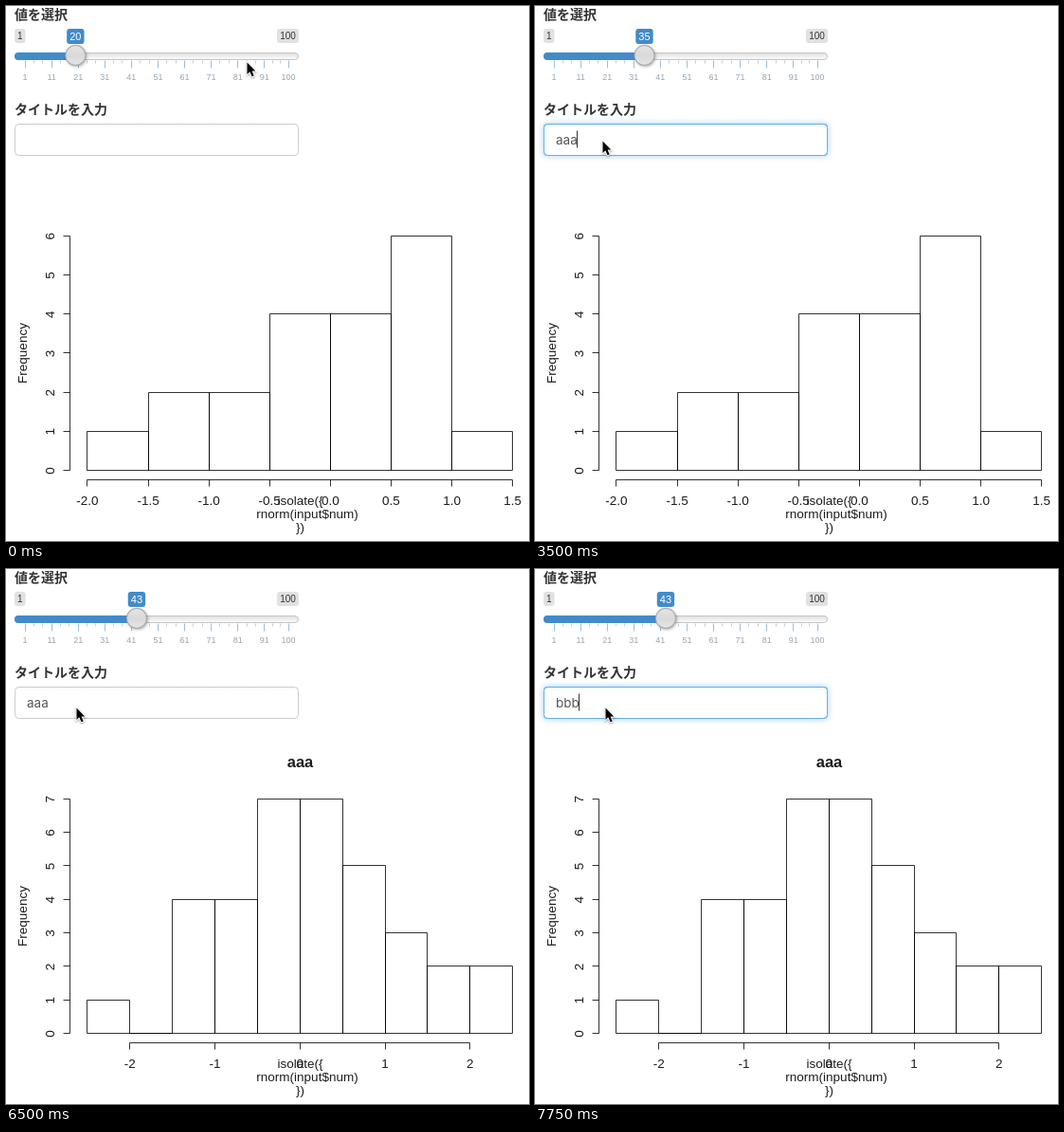
Animation, 552 px wide and 564 px high, one loop 8 s. Source, as an HTML page with a canvas:

```html
<!DOCTYPE html>
<html lang="ja">
<head>
<meta charset="utf-8">
<title>Slider and histogram</title>
<style>
html, body { margin: 0; width: 100%; height: 100%; overflow: hidden; background: #fff; }
canvas { display: block; }
</style>
</head>
<body>
<canvas id="stage" width="552" height="564"></canvas>
<script>
const ctx = document.getElementById('stage').getContext('2d');
const LOOP = 8000, STEP = 250;
const SANS = '"Liberation Sans", Arial, sans-serif';
const FIELD = '13.5px Inter, sans-serif';
const JP = '"Noto Sans CJK JP", "Noto Sans CJK", sans-serif';
const BLUE = '#428bca', INK = '#1c1c1c';

// Keys are [time, value, ...]; values are linear between them.
const POINTER = [[0, 254, 59], [250, 182, 62], [500, 70, 54], [1250, 92, 54],
  [2000, 101, 54], [2250, 111, 54], [2500, 94, 98], [2750, 71, 142], [4250, 71, 142],
  [4750, 122, 99], [5000, 146, 78], [5250, 150, 66], [5500, 150, 66], [5750, 113, 54],
  [6000, 125, 54], [6250, 135, 54], [6500, 74, 146]];
const VALUE = [[0, 20], [500, 20], [1250, 28], [1750, 28], [2250, 35], [5750, 35], [6250, 43]];
const HOVER = [[500, 2500], [5750, 6500]];
const FOCUS = [[3000, 5000], [6750, LOOP]];
const CARET = [[3000, 4000], [6750, 7000], [7500, LOOP]];
const ENTRY = [[0, ''], [3250, 'aa'], [3500, 'aaa'], [7500, 'b'], [7750, 'bbb']];

const PLOTS = [
  { counts: [1, 2, 2, 4, 4, 6, 1], from: -2, first: -2, last: 1.5, step: .5, digits: 1, title: '' },
  { counts: [1, 0, 4, 4, 7, 7, 5, 3, 2, 2], from: -2.5, first: -2, last: 2, step: 1, digits: 0, title: 'aaa' }
];

const within = (spans, t) => spans.some(([a, b]) => t >= a && t < b);
const crisp = v => Math.floor(v) + .5;
const sliderX = v => 20 + (v - 1) * 278 / 99;

function tween(keys, t) {
  const i = keys.findIndex(k => k[0] > t);
  if (i < 0) return keys[keys.length - 1].slice(1);
  if (i === 0) return keys[0].slice(1);
  const a = keys[i - 1], b = keys[i], p = (t - a[0]) / (b[0] - a[0]);
  return a.slice(1).map((v, n) => v + (b[n + 1] - v) * p);
}

function text(s, x, y, font, color = INK, align = 'center') {
  ctx.font = font;
  ctx.fillStyle = color;
  ctx.textAlign = align;
  ctx.fillText(s, x, y);
}

function upright(s, x, y, font) {
  ctx.save();
  ctx.translate(x, y);
  ctx.rotate(-Math.PI / 2);
  text(s, 0, 0, font);
  ctx.restore();
}

function line(color, width, ...points) {
  ctx.beginPath();
  points.forEach(([x, y]) => ctx.lineTo(crisp(x), crisp(y)));
  ctx.strokeStyle = color;
  ctx.lineWidth = width;
  ctx.stroke();
}

// Plot lines are thinner than a pixel, so shared bar edges come out darker.
const plotLine = (...points) => line('#000', .8, ...points);

function box(x, y, w, h, r, fill, stroke) {
  ctx.beginPath();
  ctx.roundRect(x, y, w, h, r);
  if (fill) { ctx.fillStyle = fill; ctx.fill(); }
  if (stroke) { ctx.strokeStyle = stroke; ctx.lineWidth = 1; ctx.stroke(); }
}

function disc(x, y, r, fill) {
  ctx.beginPath();
  ctx.arc(x, y, r, 0, 7);
  ctx.fillStyle = fill;
  ctx.fill();
}

function shade(y0, y1, ...colors) {
  const g = ctx.createLinearGradient(0, y0, 0, y1);
  colors.forEach((c, i) => g.addColorStop(i / (colors.length - 1), c));
  return g;
}

function shadow(color, blur, dx, dy, draw) {
  ctx.save();
  Object.assign(ctx, { shadowColor: color, shadowBlur: blur, shadowOffsetX: dx, shadowOffsetY: dy });
  draw();
  ctx.restore();
}

function drawGrid() {
  for (let i = 0; i < 11; i++) {
    const v = Math.min(100, 1 + i * 10), x = sliderX(v);
    line('#99bfdc', 1, [x, 57], [x, 65]);
    text(v, x, 78, '9px ' + SANS, '#99a4ac');
    const next = sliderX(Math.min(100, v + 10));
    for (let k = 1; k < 3 && i < 10; k++) {
      const sx = x + (next - x) * k / 3;
      line('#c3ccd3', 1, [sx, 57], [sx, 60]);
    }
  }
}

function drawSlider(value, hover) {
  const x = sliderX(value), label = Math.round(value);
  text('値を選択', 9, 14, 'bold 14px ' + JP, '#333', 'left');
  box(9, 24, 11.5, 15, 3, '#e1e1e1');
  text(1, 14.7, 35, '10px ' + SANS, '#333');
  box(286, 24, 23, 15, 3, '#e1e1e1');
  text(100, 297.5, 35, '10px ' + SANS, '#333');
  box(x - 9.2, 24, 18.4, 16, 3, BLUE);
  text(label, x, 36, '11px ' + SANS, '#fff');
  drawGrid();
  box(9.5, 49.5, 299, 7, 3.5, shade(49, 57, '#ddd', '#fff'), '#c4c4c4');
  box(9, 49, x - 9, 8, [4, 0, 0, 4], BLUE);
  shadow('rgba(0,0,0,.3)', 3, 1, 1, () => disc(x, 52, 11, '#aaa'));
  disc(x, 52, 10, hover ? '#fff' : shade(42, 62, '#e4e4e4', '#d9d9d9', '#e4e4e4'));
}

function drawInput(entry, focused, caret, selected) {
  text('タイトルを入力', 9, 114, 'bold 14px ' + JP, '#333', 'left');
  const border = focused ? '#66afe9' : '#ccc';
  if (focused) shadow('rgba(102,175,233,.6)', 7, 0, 0, () => box(9, 124, 300, 34, 4, border));
  box(9.5, 124.5, 299, 33, 4, shade(124, 128, '#f3f3f3', '#fff'), border);
  ctx.font = FIELD;
  const end = 22 + ctx.measureText(entry).width;
  if (selected) {
    ctx.fillStyle = '#abd0f5';
    ctx.fillRect(22, 131, end - 22, 18);
  }
  text(entry, 22, 146, FIELD, '#555', 'left');
  if (caret) line('#333', 1, [end, 131], [end, 149]);
}

function drawPlot({ counts, from, first, last, step, digits, title }) {
  const font = '13.5px ' + SANS;
  const left = 85.95, base = 489.6, axisLeft = 67, axisBottom = 499;
  const top = Math.max(...counts), unit = 247.4 / top, bin = 448.7 / counts.length;
  const axisX = v => left + (v - from) / .5 * bin;
  const axisY = n => base - n * unit;

  counts.forEach((n, i) => {
    const l = left + i * bin, r = left + (i + 1) * bin, y = axisY(n);
    plotLine([l, base], [l, y], [r, y], [r, base], [l, base]);
  });
  plotLine([axisLeft, base], [axisLeft, axisY(top)]);
  for (let n = 0; n <= top; n++) {
    plotLine([axisLeft - 7, axisY(n)], [axisLeft, axisY(n)]);
    upright(n, 51, axisY(n) + .5, font);
  }
  plotLine([axisX(first), axisBottom], [axisX(last), axisBottom]);
  for (let v = first; v <= last; v += step) {
    plotLine([axisX(v), axisBottom], [axisX(v), axisBottom + 7]);
    text(v.toFixed(digits), axisX(v), 526, font);
  }
  upright('Frequency', 22, 366, font);
  text('isolate({', 310.5, 526, font);
  text('rnorm(input$num)', 318, 540, font);
  text('})', 310.5, 554, font);
  text(title, 310.5, 209, 'bold 16.5px ' + SANS);
}

function drawToolbar() {
  ctx.save();
  ctx.globalAlpha = .94;
  shadow('rgba(0,0,0,.35)', 8, 0, 2, () => box(-8, 95, 393, 35, 6, shade(95, 130, '#484848', '#202020')));
  ctx.restore();
  const white = '#f4f4f4';
  ctx.strokeStyle = white;

  // speech bubble
  ctx.lineWidth = 2;
  ctx.beginPath();
  ctx.ellipse(33, 110.5, 9.5, 7, 0, 2.5, 8.2);
  ctx.lineTo(23, 121);
  ctx.closePath();
  ctx.stroke();

  disc(80, 112, 11, white);

  // perforated frame
  ctx.lineWidth = 3;
  ctx.strokeRect(118.5, 104.5, 15, 15);
  ctx.setLineDash([2, 2]);
  ctx.lineWidth = 2;
  ctx.strokeRect(116.5, 102.5, 19, 19);
  ctx.setLineDash([]);

  box(162, 102, 23, 21, 2, white);
  text('ab', 173.5, 118, 'bold 16px ' + SANS, '#2c2c2c');

  // document
  ctx.lineWidth = 1;
  ctx.strokeStyle = '#ccc';
  ctx.strokeRect(212.5, 102.5, 16, 20);
  box(212, 102, 12, 7, 0, '#ccc');
  for (let y = 112; y < 122; y += 3) {
    line('#bbb', 1, [215, y], [219, y]);
    line('#bbb', 1, [221, y], [226, y]);
  }

  disc(267, 112, 10, white);
  disc(314, 112, 11, white);
  text('( )', 361, 118, 'bold 19px ' + SANS, white);
}

function drawPointer(x, y) {
  const shape = [[0, 0], [0, 12.4], [2.8, 9.8], [5, 14.8], [7.2, 13.9], [5.1, 9], [8.8, 9]];
  ctx.beginPath();
  shape.forEach(([dx, dy]) => ctx.lineTo(x + .5 + dx, y + .5 + dy));
  ctx.closePath();
  ctx.lineJoin = 'miter';
  ctx.lineWidth = 2;
  ctx.strokeStyle = '#fff';
  shadow('rgba(0,0,0,.35)', 2, 0, 1, () => ctx.stroke());
  ctx.fillStyle = '#000';
  ctx.fill();
}

function render(t) {
  ctx.fillStyle = '#fff';
  ctx.fillRect(0, 0, 552, 564);
  const entry = ENTRY.filter(([at]) => at <= t).pop()[1];
  drawSlider(tween(VALUE, t)[0], within(HOVER, t));
  drawInput(entry, within(FOCUS, t), within(CARET, t), within([[7000, 7500]], t));
  drawPlot(PLOTS[t < 4000 ? 0 : 1]);
  if (within([[7250, 7500]], t)) drawToolbar();
  drawPointer(...tween(POINTER, t));
}

function tick() {
  const t = performance.now() % LOOP;
  render(Math.floor(t / STEP) * STEP);
  requestAnimationFrame(tick);
}
tick();
</script>
</body>
</html>
```
